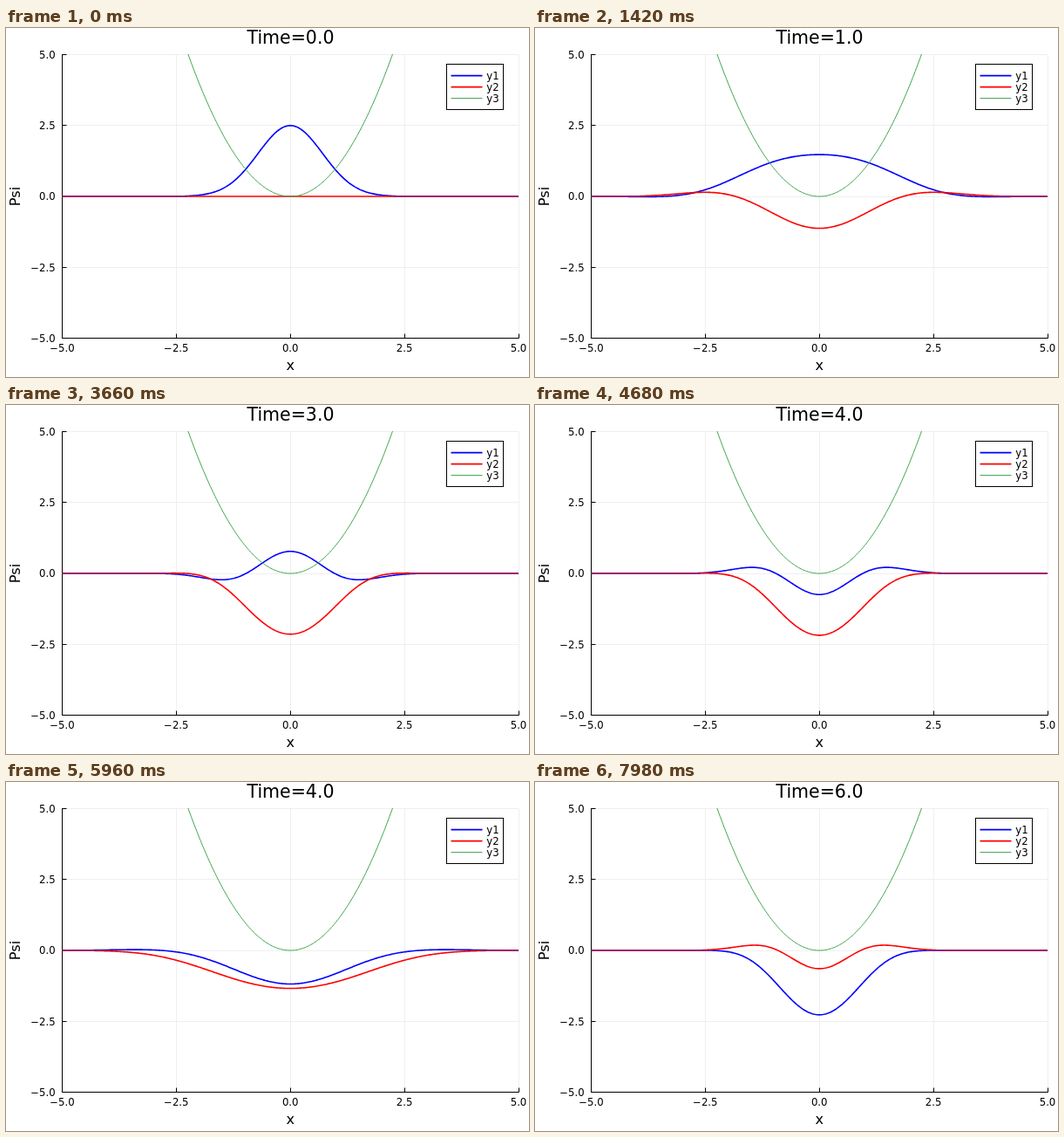
These frames come from a looping animation (600x400 px, 8000 ms). An HTML page with a canvas:

```html
<!DOCTYPE html>
<html lang="en">
<head>
<meta charset="utf-8">
<title>Oscillating wave packet</title>
<style>
  html, body { margin: 0; width: 100%; height: 100%; overflow: hidden; background: #fff; }
  canvas { display: block; width: 600px; height: 400px; }
</style>
</head>
<body>
<canvas id="stage" width="600" height="400"></canvas>
<script>
const ctx = document.getElementById('stage').getContext('2d');
const FONT = '"DejaVu Sans", sans-serif';
const STEP_MS = 20, STEPS = 400, DT = 0.015;
const LEFT = 64.4, RIGHT = 588, TOP = 30.6, BOTTOM = 355.5;
const BLUE = '#0000ff', RED = '#ff0000', GREEN = '#3da44e', PURPLE = '#8f1a80';
const TICKS = [-5, -2.5, 0, 2.5, 5];

const px = x => LEFT + (x + 5) / 10 * (RIGHT - LEFT);
const py = y => BOTTOM - (y + 5) / 10 * (BOTTOM - TOP);
const crisp = v => Math.floor(v) + 0.5;
const label = v => v.toFixed(1).replace('-', '\u2212');

function line(x1, y1, x2, y2, color, width = 1) {
  ctx.strokeStyle = color;
  ctx.lineWidth = width;
  ctx.beginPath();
  ctx.moveTo(x1, y1);
  ctx.lineTo(x2, y2);
  ctx.stroke();
}

function text(str, x, y, size, align = 'center') {
  ctx.font = `${size}px ${FONT}`;
  ctx.textAlign = align;
  ctx.fillStyle = '#000';
  ctx.fillText(str, x, y);
}

// Strokes f over [-5, 5], leaving gaps where show(x) is false.
function plot(f, color, width, show = () => true) {
  ctx.strokeStyle = color;
  ctx.lineWidth = width;
  ctx.lineJoin = 'round';
  ctx.beginPath();
  let pen = false;
  for (let i = 0; i <= 400; i++) {
    const x = -5 + i / 40;
    if (!show(x)) { pen = false; continue; }
    if (pen) ctx.lineTo(px(x), py(f(x)));
    else ctx.moveTo(px(x), py(f(x)));
    pen = true;
  }
  ctx.stroke();
}

// Exact Gaussian solution of the harmonic oscillator, starting at 2.5 exp(-x^2).
function packet(t) {
  const c = Math.cos(t), s = Math.sin(t);
  const spread = c * c + 4 * s * s;
  let turn = Math.atan2(2 * s, c);
  if (turn < 0) turn += 2 * Math.PI;
  const amp = x => 2.5 * spread ** -0.25 * Math.exp(-x * x / spread);
  const phase = x => 1.5 * s * c * x * x / spread - turn / 2;
  return {
    re: x => amp(x) * Math.cos(phase(x)),
    im: x => amp(x) * Math.sin(phase(x))
  };
}

function roundHalfEven(v) {
  const r = Math.round(v);
  return Math.abs(v % 1) === 0.5 && r % 2 ? r - 1 : r;
}

function drawGrid() {
  for (const v of TICKS) {
    line(crisp(px(v)), TOP, crisp(px(v)), BOTTOM, '#efefef');
    line(LEFT, crisp(py(v)), RIGHT, crisp(py(v)), '#efefef');
  }
}

function drawAxes() {
  const x0 = crisp(LEFT), y0 = crisp(BOTTOM);
  line(x0, TOP - 0.5, x0, y0 + 0.5, '#000');
  line(x0 - 0.5, y0, RIGHT + 0.5, y0, '#000');
  for (const v of TICKS) {
    const x = crisp(px(v)), y = crisp(py(v));
    line(x, y0, x, y0 - 5, '#000');
    line(x0, y, x0 + 5, y, '#000');
    text(label(v), px(v), 371.3, 11.7);
    text(label(v), 56.6, py(v) + 4.3, 11.7, 'right');
  }
  text('x', 326.2, 391.5, 16.1);
  ctx.save();
  ctx.translate(16, 193);
  ctx.rotate(-Math.PI / 2);
  text('Psi', 0, 0, 16.1);
  ctx.restore();
}

function drawLegend() {
  ctx.fillStyle = '#fff';
  ctx.fillRect(505, 41, 66, 53);
  ctx.strokeStyle = '#000';
  ctx.lineWidth = 1;
  ctx.strokeRect(505.5, 41.5, 65, 52);
  [[BLUE, 1.6], [RED, 1.6], [GREEN, 1]].forEach(([color, width], i) => {
    const y = 54.6 + 13 * i;
    line(510.5, y, 546.5, y, color, width);
    text('y' + (i + 1), 551.3, y + 4.3, 11.7, 'left');
  });
}

function draw(t) {
  const { re, im } = packet(t);
  const merged = x => Math.abs(re(x)) < 0.016 && Math.abs(im(x)) < 0.016;
  ctx.fillStyle = '#fff';
  ctx.fillRect(0, 0, 600, 400);
  drawGrid();
  drawAxes();
  text('Time=' + roundHalfEven(t).toFixed(1), 326.5, 18.2, 20.5);

  ctx.save();
  ctx.beginPath();
  ctx.rect(LEFT, TOP - 0.6, RIGHT - LEFT, BOTTOM - TOP + 0.6);
  ctx.clip();
  plot(re, BLUE, 1.6);
  plot(im, RED, 1.6);
  plot(x => (re(x) + im(x)) / 2, PURPLE, 1.6, merged);
  plot(x => x * x, GREEN, 1);
  ctx.restore();
  drawLegend();
}

const start = performance.now();
function tick() {
  const step = Math.floor((performance.now() - start) / STEP_MS) % STEPS;
  draw(step * 15 / 1000);
  requestAnimationFrame(tick);
}
tick();
</script>
</body>
</html>
```
